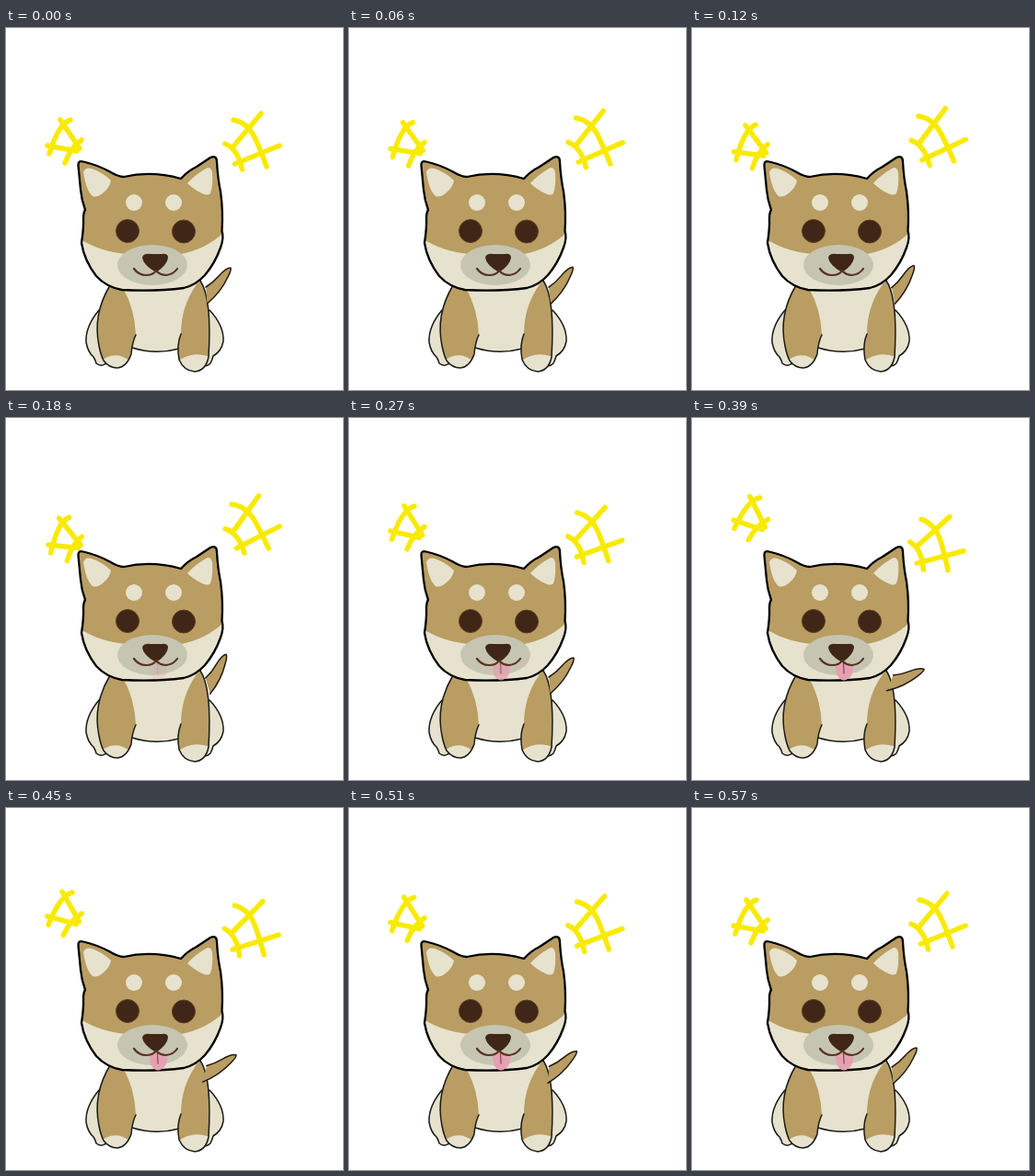
An HTML page that plays this animation: 366 by 394 pixels, repeating every 0.6 s.

```html
<!DOCTYPE html>
<html lang="en">
<head>
<meta charset="utf-8">
<title>Happy puppy</title>
<style>
  html, body { margin: 0; width: 100%; height: 100%; overflow: hidden; background: #fff; }
  svg { display: block; width: 366px; height: 394px; }
  .tan { fill: #b99d62; }
  .cream { fill: #e6e2cd; }
  .dark { fill: #3f2617; }
  .line { fill: none; stroke: #1a1a1a; stroke-width: 1.5; }
  svg * { stroke-linecap: round; stroke-linejoin: round; }
</style>
</head>
<body>
<svg viewBox="0 0 366 394">
  <defs>
    <path id="head" d="M78.500 150Q78 143.500 84 145.500Q99 149 112 156Q122 162 128 162Q158 155 190 164Q197 156 207 151L222 141Q229 138 229 146Q230 164 233 178Q236 200 234.500 221Q237 228 233 239Q227 256 216 269Q206 280 193 283Q162 287 126 285Q109 282 98 270Q85 253 82 234Q84.500 218 84 207Q84 201 86 198Q82 187 81 176Z"/>
    <path id="armL" d="M113 280C101 300 96 322 101 346Q103 356 106 362Q112 370 121 370Q131 369 136 355Q137 342 141 334Q140 306 127 283Z"/>
    <path id="armR" d="M211 275C221 290 222 325 220 358Q217 373 205 374Q193 373 188 361Q185 345 190 333Q190 303 207 279Z"/>
    <clipPath id="inHead"><use href="#head"/></clipPath>
    <clipPath id="inArmL"><use href="#armL"/></clipPath>
    <clipPath id="inArmR"><use href="#armR"/></clipPath>
  </defs>

  <g id="sparks" fill="none" stroke="#f8ea00" stroke-width="5.500">
    <path d="M59 100L80 131M70 100Q57 104 47 137M45 128L77 134M82 122Q70 130 64 147"/>
    <path d="M247 100Q263 103 271 121Q277 134 283 151M277 93L246 130M248.500 148L297 128M238 126Q252 132 256.500 154"/>
  </g>

  <g class="cream" stroke="#1a1a1a" stroke-width="1.5">
    <path d="M101 307Q86 325 87 342Q89 353 95 358Q97 361 98 365Q103 369 107 366Q111 365 112 361L118 320Z"/>
    <path d="M221 307Q237 324 236 341Q234 352 225 357Q224 361 222 365Q218 369 214 367L204 320Z"/>
  </g>
  <path class="cream" d="M122 278H211L198 320L188 349Q163 356 137 348Z"/>
  <path class="line" d="M137 348Q163 356 188 349"/>

  <use href="#armL" class="tan"/>
  <path class="cream" clip-path="url(#inArmL)" d="M100 365Q117 349 134 362V375H100Z"/>
  <use href="#armR" class="tan"/>
  <path class="cream" clip-path="url(#inArmR)" d="M184 365Q202 349 224 359V378H184Z"/>
  <path class="line" d="M113 280C101 300 96 322 101 346Q103 356 106 362Q112 370 121 370Q131 369 136 355Q137 342 141 334"/>
  <path class="line" d="M211 275C221 290 222 325 220 358Q217 373 205 374Q193 373 188 361Q185 345 190 333"/>

  <path id="tail" class="tan" stroke="#221a10" stroke-width="1.5" d="M217 282Q225 277 231 270Q239 261 244 261Q245 263 241 271Q233 288 218.500 300"/>

  <use href="#head" class="tan"/>
  <path class="cream" clip-path="url(#inHead)" d="M78 228Q100 243 130 246H190Q220 240 240 219V290H78Z"/>
  <ellipse cx="159" cy="258" rx="38" ry="22" fill="#c5c5b2"/>
  <use href="#head" fill="none" stroke="#000" stroke-width="2.3"/>

  <g class="cream">
    <path d="M84 157Q86 151 93 153Q105 157 114 166Q113 173 106 179Q99 185 94 183Q87 177 84 157Z"/>
    <path d="M224 157Q222 150 217 153Q205 160 197 169Q204 176 213 180Q219 183 222 180Q225 171 224 157Z"/>
    <circle cx="139" cy="190" r="9"/>
    <circle cx="182" cy="190" r="9"/>
  </g>
  <g class="dark" stroke="#5c3a20" stroke-width="1">
    <circle cx="132" cy="221" r="12.500"/>
    <circle cx="193" cy="221.500" r="12.500"/>
  </g>
  <g id="tongue">
    <path fill="#e5a1b1" d="M156 268Q162 268 164 265Q168 268 175 268Q176 284 165 285.500Q155 284 156 268Z"/>
    <path d="M164.500 267L165 278" stroke="#85505c" stroke-width="1.300"/>
  </g>
  <path class="dark" d="M148 250Q149 245 157 246H169Q176 245 176 250Q175 258 163 266Q149 258 148 250Z"/>
  <path d="M139 262Q144 269 152 269Q160 269 163 264Q167 269 174 269Q182 268 186 262" fill="none" stroke="#58331f" stroke-width="2.2"/>
</svg>
<script>
  const LOOP = 600, STEP = 30, SWING = 180;
  const part = id => document.getElementById(id);
  const clamp = x => Math.min(1, Math.max(0, x));

  // Three linear swings: back by a, forward to 2a, then home.
  function sway(t, a) {
    const keys = [0, -a, 2 * a, 0];
    const u = Math.min(3, Math.max(0, t / SWING));
    const i = Math.min(2, Math.floor(u));
    return keys[i] + (keys[i + 1] - keys[i]) * (u - i);
  }

  const turn = (id, angle, x, y) =>
    part(id).setAttribute('transform', `rotate(${angle} ${x} ${y})`);

  function draw(now) {
    const t = Math.floor(now % LOOP / STEP) * STEP;
    turn('sparks', sway(t, 4.6), 171, 121);
    turn('tail', sway(t - STEP, 13.5), 222, 284);
    part('tongue').setAttribute('opacity', clamp((t - 150) / 150));
  }

  const start = performance.now();
  function loop() {
    draw(performance.now() - start);
    requestAnimationFrame(loop);
  }
  loop();
</script>
</body>
</html>
```
